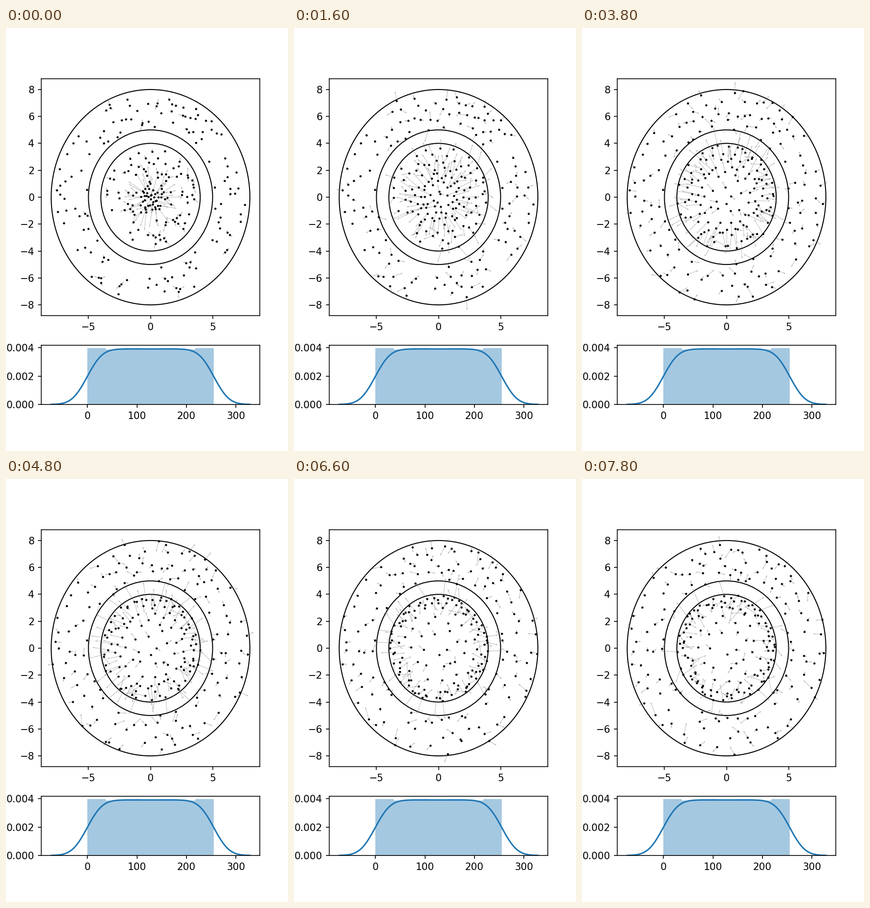
A matplotlib script that plays this animation: 600 px wide and 900 px high, repeating every 8 s.

```python
import numpy as np
import matplotlib.pyplot as plt
from matplotlib.animation import FuncAnimation

FRAMES, INTERVAL = 40, 200
WARMUP = 2           # steps taken before the first frame
COUNT = 128          # particles in each region
SOFT = 0.02          # softening for very close pairs
ARROW = 17           # drawn arrow length per unit of speed


def scatter(rng, low, high):
    """Random places, uniform in radius and in angle."""
    r = rng.uniform(low, high, COUNT)
    a = rng.uniform(0, 2 * np.pi, COUNT)
    return np.column_stack([r * np.cos(a), r * np.sin(a)])


def simulate(pos, cap, inner, outer, push, reach):
    """Repelling particles that bounce between two circular walls."""
    vel = np.zeros_like(pos)
    states = []
    for _ in range(FRAMES + WARMUP):
        gap = pos[:, None] - pos[None]
        d2 = (gap ** 2).sum(-1)
        force = np.where(d2 < reach ** 2, push / (d2 + SOFT) ** 1.5, 0)
        vel = vel + (gap * force[..., None]).sum(1)
        speed = np.hypot(*vel.T) + 1e-9
        vel = vel * np.minimum(1, cap / speed)[:, None]
        pos = pos + vel

        r = np.hypot(*pos.T) + 1e-9
        normal = pos / r[:, None]
        radial = (vel * normal).sum(1)
        hit = ((r > outer) & (radial > 0)) | ((r < inner) & (radial < 0))
        vel = vel - 2 * (radial * hit)[:, None] * normal
        pos = normal * np.clip(r, inner, outer)[:, None]
        states.append((pos, vel))
    return states[WARMUP:]


rng = np.random.default_rng(12)
disc = scatter(rng, .08, 3.72)
ring = scatter(rng, 5.15, 7.65)
# Particles near the centre stay slow, so a few linger there
disc_cap = np.clip(.3 * np.hypot(*disc.T), .02, .08)

history = [
    (np.vstack([p, q]), np.vstack([u, v]))
    for (p, u), (q, v) in zip(
        simulate(disc, disc_cap, 0, 4, push=.0005, reach=2),
        simulate(ring, .06, 5, 8, push=.0004, reach=1.3))
]

fig, (field, dist) = plt.subplots(
    2, 1, figsize=(4, 6), dpi=150, gridspec_kw={"height_ratios": [4, 1]})

# Particle field
field.set(xlim=(-8.8, 8.8), ylim=(-8.8, 8.8),
          xticks=[-5, 0, 5], yticks=range(-8, 9, 2))
for radius in (4, 5, 8):
    field.add_patch(plt.Circle((0, 0), radius, fill=False, lw=1))
pos, vel = history[0]
arrows = field.quiver(*pos.T, *vel.T, color="0.45", alpha=.5, width=.0022,
                      angles="xy", scale_units="xy", scale=1 / ARROW)
dots, = field.plot(*pos.T, "o", color="black", ms=2.2, mew=0)

# Histogram of the levels with a Gaussian density estimate
levels = np.arange(256)
heights, _, _ = dist.hist(levels, bins=7, density=True, color="C0", alpha=.4)
width = levels.std(ddof=1) * len(levels) ** -.2
grid = np.linspace(-3 * width, 255 + 3 * width, 200)
bells = np.exp(-.5 * ((grid[:, None] - levels) / width) ** 2)
dist.plot(grid, bells.mean(1) / (width * np.sqrt(2 * np.pi)), color="C0")
margin = .05 * (grid[-1] - grid[0])
dist.set(xlim=(grid[0] - margin, grid[-1] + margin),
         ylim=(0, 1.05 * heights.max()),
         xticks=[0, 100, 200, 300], yticks=[0, .002, .004])
dist.yaxis.set_major_formatter("{x:.3f}")


def draw(i):
    pos, vel = history[i]
    dots.set_data(*pos.T)
    arrows.set_offsets(pos)
    arrows.set_UVC(*vel.T)
    return dots, arrows


anim = FuncAnimation(fig, draw, frames=FRAMES, interval=INTERVAL,
                     repeat=True, repeat_delay=0, blit=False)
plt.show()
```
